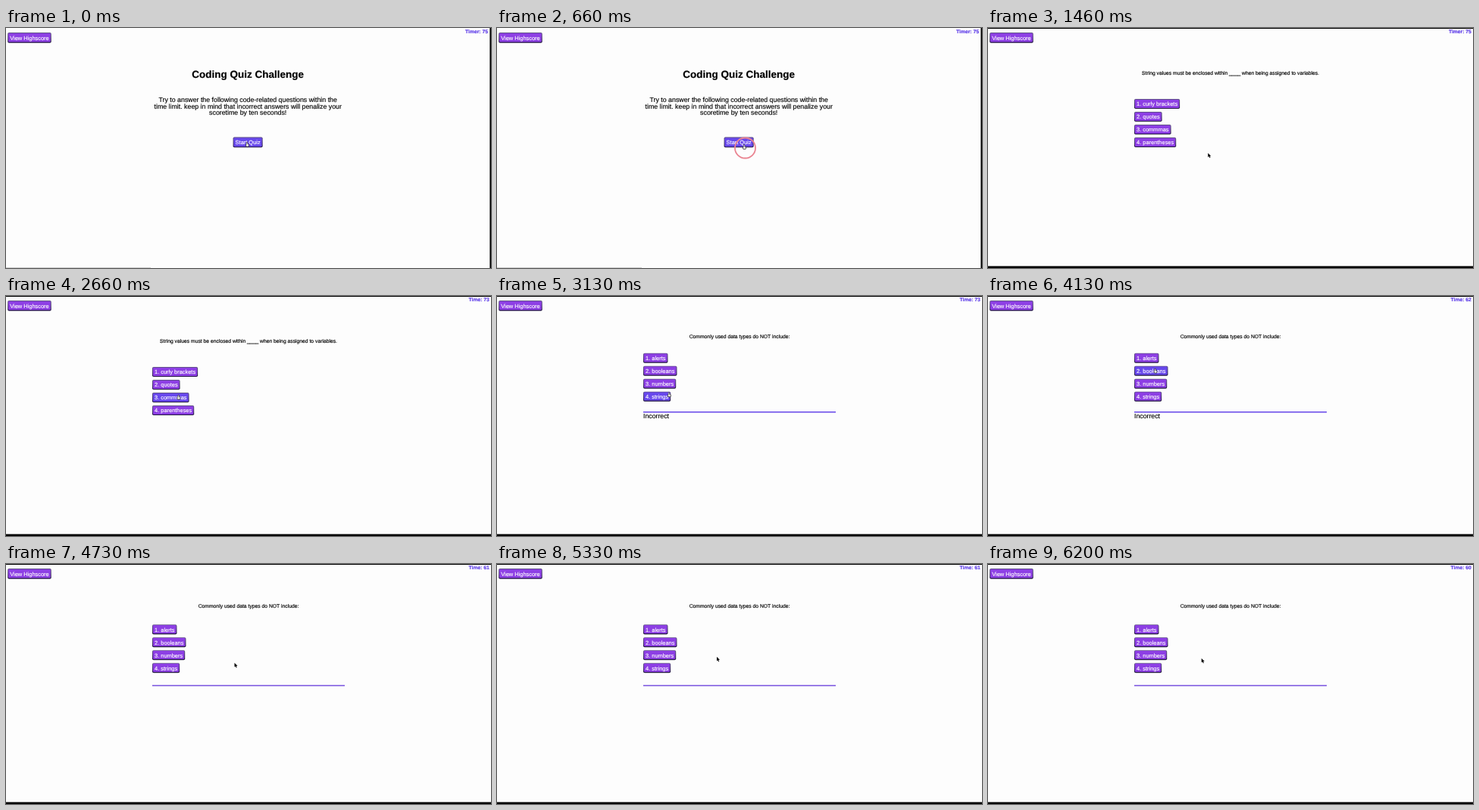
Write an HTML page with a canvas that moves like this. It is 640 px wide and 318 px high and loops after 6.26 s.

```html
<!DOCTYPE html>
<html lang="en">
<head>
<meta charset="utf-8">
<title>Coding quiz</title>
<style>
html, body { margin: 0; width: 100%; height: 100%; overflow: hidden; background: #fdfdfd; }
canvas { display: block; }
</style>
</head>
<body>
<canvas id="stage" width="640" height="318"></canvas>
<script>
const ctx = document.getElementById('stage').getContext('2d');
const LOOP = 6260, START = 800, ANSWER = 2990, CLEAR = 4330;
const PURPLE = '#8d3fe4', HOVER = '#6848ec', ACCENT = '#5a38e8';
const ROW = 17, LEFT = 193;

// Each move leaves at a time and glides to its point
const TRAVEL = 370;
const HOME = { x: 318, y: 151 };
const MOVES = [
  { at: 190, x: 326, y: 154.5 },
  { at: 1050, x: 290.3, y: 165.7 },
  { at: 2260, x: 227.5, y: 131 },
  { at: 3060, x: 220.5, y: 96 },
  { at: 4330, x: 301.5, y: 131 },
  { at: 4950, x: 290, y: 123 },
  { at: 5830, x: 281.7, y: 125 }
];
const CLICKS = [560, 2860];

const QUESTIONS = [
  ['String values must be enclosed within ____ when being assigned to variables.',
    ['curly brackets', 'quotes', 'commmas', 'parentheses']],
  ['Commonly used data types do NOT include:',
    ['alerts', 'booleans', 'numbers', 'strings']]
];

let pointer, overButton;

const clamp = u => Math.min(1, Math.max(0, u));
const ease = u => u * u * (3 - 2 * u);

function pointerAt(t) {
  return MOVES.reduce((from, to) => {
    const e = ease(clamp((t - to.at) / TRAVEL));
    return { x: from.x + (to.x - from.x) * e, y: from.y + (to.y - from.y) * e };
  }, HOME);
}

function setFont(size, weight = '') {
  ctx.font = `${weight} ${size}px "Liberation Sans", Arial, sans-serif`;
}

function text(s, x, y, size, align = 'left', color = '#000', weight = '') {
  setFont(size, weight);
  ctx.textAlign = align;
  ctx.fillStyle = ctx.strokeStyle = color;
  ctx.lineWidth = 0.15;
  ctx.fillText(s, x, y);
  ctx.strokeText(s, x, y);
}

function rect(x, y, w, h, color) {
  ctx.fillStyle = color;
  ctx.fillRect(x, y, w, h);
}

function rounded(x, y, w, h, r, fill) {
  ctx.beginPath();
  ctx.roundRect(x, y, w, h, r);
  ctx.fillStyle = fill;
  ctx.fill();
}

function button(label, x, y, h = 13) {
  const size = 7.45;
  setFont(size);
  const w = ctx.measureText(label).width + 6;
  const hover = pointer.x > x && pointer.x < x + w && pointer.y > y && pointer.y < y + h;
  overButton ||= hover;
  const edge = ctx.createLinearGradient(0, y, 0, y + h);
  edge.addColorStop(0, '#65578c');
  edge.addColorStop(1, '#1d123c');
  rounded(x, y, w, h, 1.8, edge);
  rounded(x + 0.9, y + 0.9, w - 1.9, h - 2, 1, hover ? HOVER : PURPLE);
  text(label, x + 3, y + h / 2 + 2.9, size, 'left', '#fff');
}

function header(timer, right) {
  button('View Highscore', 2.2, 6, 13.7);
  text(timer, right, 7, 6.75, 'right', ACCENT, 'bold');
}

function intro() {
  rect(638.4, 0, 1.6, 318, '#000');
  rect(0, 317, 191, 1, '#cfcfcf');
  header('Timer: 75', 636);
  text('Coding Quiz Challenge', 319.2, 66.2, 13.5, 'center', '#000', 'bold');
  ['Try to answer the following code-related questions within the',
    'time limit. keep in mind that incorrect answers will penalize your',
    'scoretime by ten seconds!'
  ].forEach((line, i) => text(line, 319.2, 98.2 + i * 8.6, 8.8, 'center'));
  button('Start Quiz', 299.6, 144.5, 13.8);
}

// One tick a second; the wrong answer costs ten at the third tick
function timerLabel(t) {
  const ticks = Math.max(0, Math.floor((t - 600) / 1000));
  return (ticks ? 'Time: ' : 'Timer: ') + (75 - ticks - (ticks > 2 ? 10 : 0));
}

function quiz(t) {
  rect(0, 0, 640, 1, '#000');
  rect(0, 315.5, 640, 2.5, '#000');
  header(timerLabel(t), 637.8);

  const answered = t >= ANSWER, cleared = t >= CLEAR;
  const [ask, options] = QUESTIONS[+answered];
  const askY = !answered ? 62.2 : cleared ? 57.5 : 56;
  const top = !answered ? 94 : cleared ? 80.2 : 75.7;
  text(ask, 320, askY, 6.77, 'center');
  options.forEach((o, i) => button(`${i + 1}. ${o}`, LEFT, top + i * ROW));
  if (!answered) return;
  rect(LEFT, cleared ? 160.4 : 153.1, 254, 1.4, cleared ? '#7048de' : ACCENT);
  if (!cleared) text('Incorrect', LEFT, 161.8, 8.75);
}

function drawHand() {
  rounded(-1.8, 2.2, 4.6, 4.2, 1.6, '#333');
  rounded(-0.9, -0.2, 2, 4, 1, '#333');
  rounded(-1.1, 2.9, 3.2, 2.8, 1, '#eee');
  rounded(-0.4, 0.4, 1, 3, 0.5, '#eee');
}

function drawArrow() {
  const arrow = new Path2D('M0 0V5.6L1.3 4.4 2.2 6.5 3.2 6.1 2.3 4.1H4Z');
  ctx.lineWidth = 0.9;
  ctx.strokeStyle = '#fff';
  ctx.stroke(arrow);
  ctx.fillStyle = '#000';
  ctx.fill(arrow);
}

function drawRing(t) {
  const age = t - CLICKS.findLast(c => t >= c);
  if (!(age < 240)) return;
  ctx.globalAlpha = clamp((240 - age) / 100);
  ctx.beginPath();
  ctx.arc(1.5, 4.5, 5 + 8.5 * clamp(age / 100), 0, 7);
  ctx.lineWidth = 1.8;
  ctx.strokeStyle = '#ea8592';
  ctx.stroke();
  ctx.globalAlpha = 1;
}

function draw(t) {
  pointer = pointerAt(t);
  overButton = false;
  ctx.textRendering = 'geometricPrecision';
  rect(0, 0, 640, 318, '#fdfdfd');
  if (t < START) intro();
  else quiz(t);

  ctx.save();
  ctx.translate(pointer.x, pointer.y);
  drawRing(t);
  if (overButton) drawHand();
  else drawArrow();
  ctx.restore();
}

const began = performance.now();
function frame() {
  draw((performance.now() - began) % LOOP);
  requestAnimationFrame(frame);
}
frame();
</script>
</body>
</html>
```
